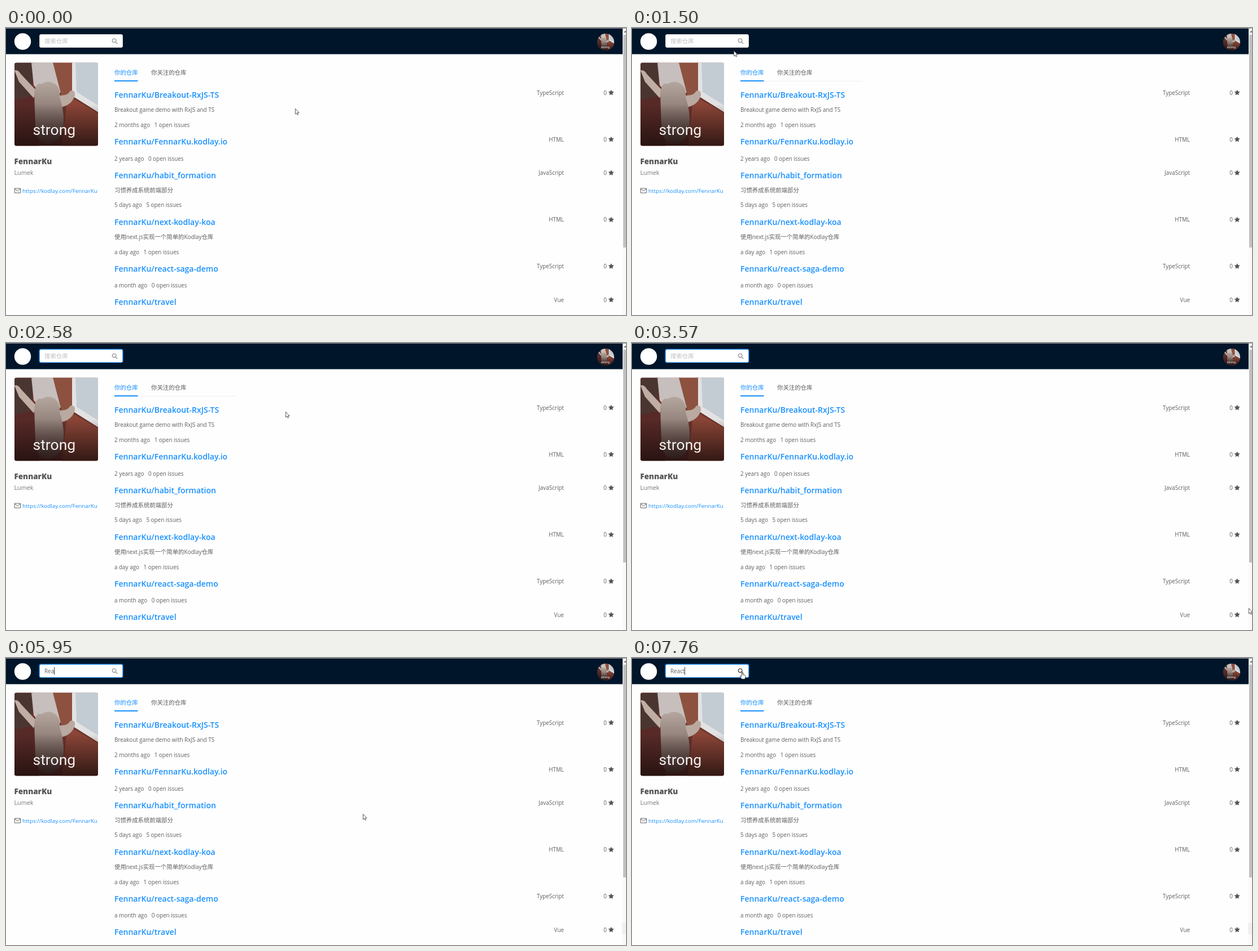
Recreate the animation shown at these times as an HTML page. Size 1098 px wide and 510 px high, loop 8000 ms.

```html
<!DOCTYPE html>
<html lang="zh">
<head>
<meta charset="utf-8">
<title>Repositories</title>
<style>
  html, body { margin: 0; width: 100%; height: 100%; overflow: hidden; background: #fefefe; }
  svg { display: block; }
  text { font: 9.9px "Open Sans", "Noto Sans CJK SC", "Noto Sans CJK", sans-serif; fill: #5f5f5f; white-space: pre; }
  .cjk { font-family: "Noto Sans CJK SC", "Noto Sans CJK", sans-serif; font-size: 10.4px; }
  .title { font-size: 14px; font-weight: 600; fill: #1890ff; }
  .name { font-size: 13.5px; font-weight: 800; fill: #555; }
  .nick { font-size: 10.8px; fill: #777; }
  .link { font-size: 9.8px; }
  .blue { fill: #1890ff; }
  .hint { fill: #bfbfbf; }
  .caption { font: 26.5px Roboto, sans-serif; fill: #f4efed; }
  .end { text-anchor: end; }
</style>
</head>
<body>
<svg id="stage" width="1098" height="510" viewBox="0 0 1098 510">
  <defs>
    <linearGradient id="shade" x1="0" y1="0" x2="0" y2="1">
      <stop offset=".5" stop-color="#1c0d0c" stop-opacity="0"/>
      <stop offset="1" stop-color="#1c0d0c" stop-opacity=".8"/>
    </linearGradient>
    <linearGradient id="fur" x1="0" y1="0" x2="0" y2="1">
      <stop offset="0" stop-color="#b5a79f"/>
      <stop offset="1" stop-color="#5f4b46"/>
    </linearGradient>
    <clipPath id="round"><rect width="148" height="148" rx="4"/></clipPath>
    <clipPath id="disc"><circle cx="74" cy="74" r="74"/></clipPath>
    <g id="photo">
      <rect width="148" height="148" fill="#6b332d"/>
      <path d="M0 0H34L30 60 0 70Z" fill="#4b3531"/>
      <path d="M30 0H80L88 52 50 60 34 40Z" fill="#c6bfbd"/>
      <path d="M68 0H104L102 58 84 62Z" fill="#8d5140"/>
      <path d="M102 0H148V84L104 56Z" fill="#c3ccd3"/>
      <path d="M102 0H108L110 52 148 76V88L102 59Z" fill="#e3e2e2"/>
      <path d="M94 58 148 90V148H84Z" fill="#8a4537"/>
      <path d="M0 66 36 58 44 148H0Z" fill="#572a27"/>
      <path d="M0 14Q6 12 11 20L39 50 34 63 8 34Z" fill="#c0aea4"/>
      <path d="M78 58Q94 60 99 50 108 48 107 58 102 76 80 80Z" fill="#b9a9a0"/>
      <path d="M35 54Q38 34 48 38 60 30 72 38 82 46 80 62 90 92 86 118 80 144 58 144 38 142 37 112Z" fill="url(#fur)"/>
      <rect width="148" height="148" fill="url(#shade)"/>
      <text class="caption" x="32.5" y="128.5">strong</text>
    </g>
  </defs>

  <rect width="1092" height="46.5" fill="#001529"/>
  <rect width="1098" height="1" fill="#8b929a"/>
  <circle cx="29.5" cy="24" r="14.7" fill="#fff"/>
  <g transform="translate(1047 10) scale(.2027)" clip-path="url(#disc)"><use href="#photo"/></g>

  <rect id="ring" x="58" y="10" width="150" height="25.5" rx="4" fill="#1890ff" opacity=".45"/>
  <rect id="box" x="59.5" y="11.5" width="147" height="23" rx="2.5" fill="#fff"/>
  <text id="hint" class="cjk hint" x="68" y="27.2">搜索仓库</text>
  <text id="typed" x="68" y="27"></text>
  <rect id="caret" y="16" width="1" height="14" fill="#444"/>
  <g id="lens" fill="none" stroke-width="1.1"><circle cx="191.6" cy="22.3" r="3.3"/><path d="M194 24.8 197.2 28"/></g>

  <g transform="translate(15 61.5)" clip-path="url(#round)"><use href="#photo"/></g>
  <text class="name" x="14.5" y="241.5">FennarKu</text>
  <text class="nick" x="14.5" y="261.3">Lumek</text>
  <path d="M15.2 285H25.6V293H15.2ZM15.2 285.8 20.4 289.6 25.6 285.8" fill="none" stroke="#5f5f5f"/>
  <text class="link blue" x="29" y="292.5">https://kodlay.com/FennarKu</text>

  <rect id="rule" x="192" y="94" width="216" height="1" fill="#efefef"/>
  <text class="cjk blue" x="192" y="83">你的仓库</text>
  <text class="cjk" x="257" y="83">你关注的仓库</text>
  <rect x="192" y="93" width="41.5" height="2" fill="#1890ff"/>
  <g id="repos"></g>

  <rect x="1092" y="1" width="6" height="509" fill="#f9f9f9"/>
  <path d="M1094 8 1097 4.5 1098 6V8Z" fill="#777"/>
  <rect x="1093" y="12" width="5" height="378" fill="#c1c1c1"/>
  <rect id="patch" x="1091" y="471" width="7" height="20" fill="#f0f0f0"/>

  <g id="pointer">
    <path id="arrow" d="M.4.4V10L2.6 8 4.1 11.3 5.6 10.6 4.1 7.4H7Z" fill="#fff" stroke="#333" stroke-width=".8"/>
    <path id="beam" d="M-2 -5H-.5L0 -4.5 .5 -5H2M0 -4.5V4.5M-2 5H-.5L0 4.5 .5 5H2" fill="none" stroke="#333"/>
    <path id="hand" d="M-1 0Q0 -1 1 0V4.5L5 5.4Q6.3 6 6 8L5 12.5H-.5L-4 7.5Q-3.6 6-1 8Z" fill="#fff" stroke="#222" stroke-width=".8"/>
  </g>
</svg>
<script>
const $ = id => document.getElementById(id);
const LOOP = 8000;

const repos = [
  // baseline, name, language, age, issues, description
  [124, 'Breakout-RxJS-TS', 'TypeScript', '2 months ago', 1, 'Breakout game demo with RxJS and TS'],
  [207, 'FennarKu.kodlay.io', 'HTML', '2 years ago', 0],
  [266.5, 'habit_formation', 'JavaScript', '5 days ago', 5, '习惯养成系统前端部分'],
  [349.7, 'next-kodlay-koa', 'HTML', 'a day ago', 1, '使用next.js实现一个简单的Kodlay仓库'],
  [432.5, 'react-saga-demo', 'TypeScript', 'a month ago', 0],
  [492, 'travel', 'Vue', '', 0]
];

const label = (x, y, body, cls = '') => `<text class="${cls}" x="${x}" y="${y}">${body}</text>`;

// Latin runs are set slightly smaller than the Chinese ones.
const mixed = s => s.replace(/[\u4e00-\u9fff]+/g, run => `<tspan class="cjk">${run}</tspan>`);

function star(cx, cy, r) {
  const points = Array.from({ length: 10 }, (_, i) => {
    const a = i * Math.PI / 5, k = i % 2 ? r * .5 : r;
    return `${(cx + k * Math.sin(a)).toFixed(2)},${(cy - k * Math.cos(a)).toFixed(2)}`;
  });
  return `<polygon points="${points.join(' ')}" fill="#555"/>`;
}

$('repos').innerHTML = repos.map(([y, name, lang, age, issues, about]) =>
  label(192, y, 'FennarKu/' + name, 'title') +
  label(988, y - 5.3, lang, 'end') +
  label(1064, y - 5.3, '0', 'end') +
  star(1071.7, y - 9, 5.3) +
  (about ? label(192, y + 25.2, mixed(about)) : '') +
  (age ? label(192, y + (about ? 51.8 : 28.6), `${age}<tspan dx="7.5">${issues} open issues</tspan>`) : '')
).join('');

const moves = [
  // time, x, y, shape
  [0, 512, 143, 'arrow'], [720, 502, 136, 'arrow'], [850, 470, 118, 'arrow'], [980, 408, 96, 'arrow'],
  [1110, 340, 78, 'arrow'], [1240, 270, 62, 'arrow'], [1370, 215, 49, 'arrow'], [1500, 180, 40, 'arrow'],
  [1650, 150, 25, 'beam'], [1800, 137, 21, 'beam'], [1930, 134, 20, 'beam'],
  [2320, 230, 48, 'arrow'], [2450, 400, 100, 'arrow'], [2580, 495, 122, 'arrow'],
  [3420, 800, 300, 'arrow'], [3570, 1092, 471, 'arrow'], [3690, 0, 0, 'none'],
  [4120, 1040, 480, 'arrow'], [4250, 890, 435, 'arrow'], [4390, 744, 379, 'arrow'],
  [4540, 672, 318, 'arrow'], [4690, 633, 280, 'arrow'], [4820, 632, 277, 'arrow'],
  [6640, 678, 266, 'arrow'], [6780, 470, 130, 'arrow'], [6940, 224, 27, 'arrow'],
  [7220, 214, 26, 'arrow'], [7350, 204, 25, 'arrow'], [7490, 197, 25, 'hand'], [7620, 195, 25, 'hand']
];
const typing = [[0, ''], [4540, 'R'], [5650, 'Re'], [5950, 'Rea'], [6360, 'Reac'], [6640, 'React']];
const caret = [[0, 0], [1930, 1], [2580, 0], [3010, 1], [3420, 0], [3950, 1], [4390, 0],
  [4540, 1], [5250, 0], [5650, 1], [7220, 0], [7760, 1]];
const border = [[0, '#d9d9d9'], [1650, '#40a9ff']];

const at = (table, t) => table.findLast(row => row[0] <= t);
const show = (id, on) => { $(id).style.display = on ? '' : 'none'; };

function draw(t) {
  const [, x, y, shape] = at(moves, t);
  $('pointer').setAttribute('transform', `translate(${x} ${y})`);
  for (const id of ['arrow', 'beam', 'hand']) show(id, id === shape);

  const word = at(typing, t)[1];
  $('typed').textContent = word;
  show('hint', !word);
  const end = word ? $('typed').getComputedTextLength() : 0;
  $('caret').setAttribute('x', Math.floor(68 + end));
  show('caret', at(caret, t)[1]);

  $('box').setAttribute('stroke', at(border, t)[1]);
  show('ring', t >= 2190);
  $('lens').setAttribute('stroke', shape === 'hand' ? '#222' : '#858585');
  show('rule', t >= 980 && t < 3420);
  show('patch', t >= 3690);
}

const start = performance.now();
function tick() {
  draw((performance.now() - start) % LOOP);
  requestAnimationFrame(tick);
}
tick();
</script>
</body>
</html>
```
